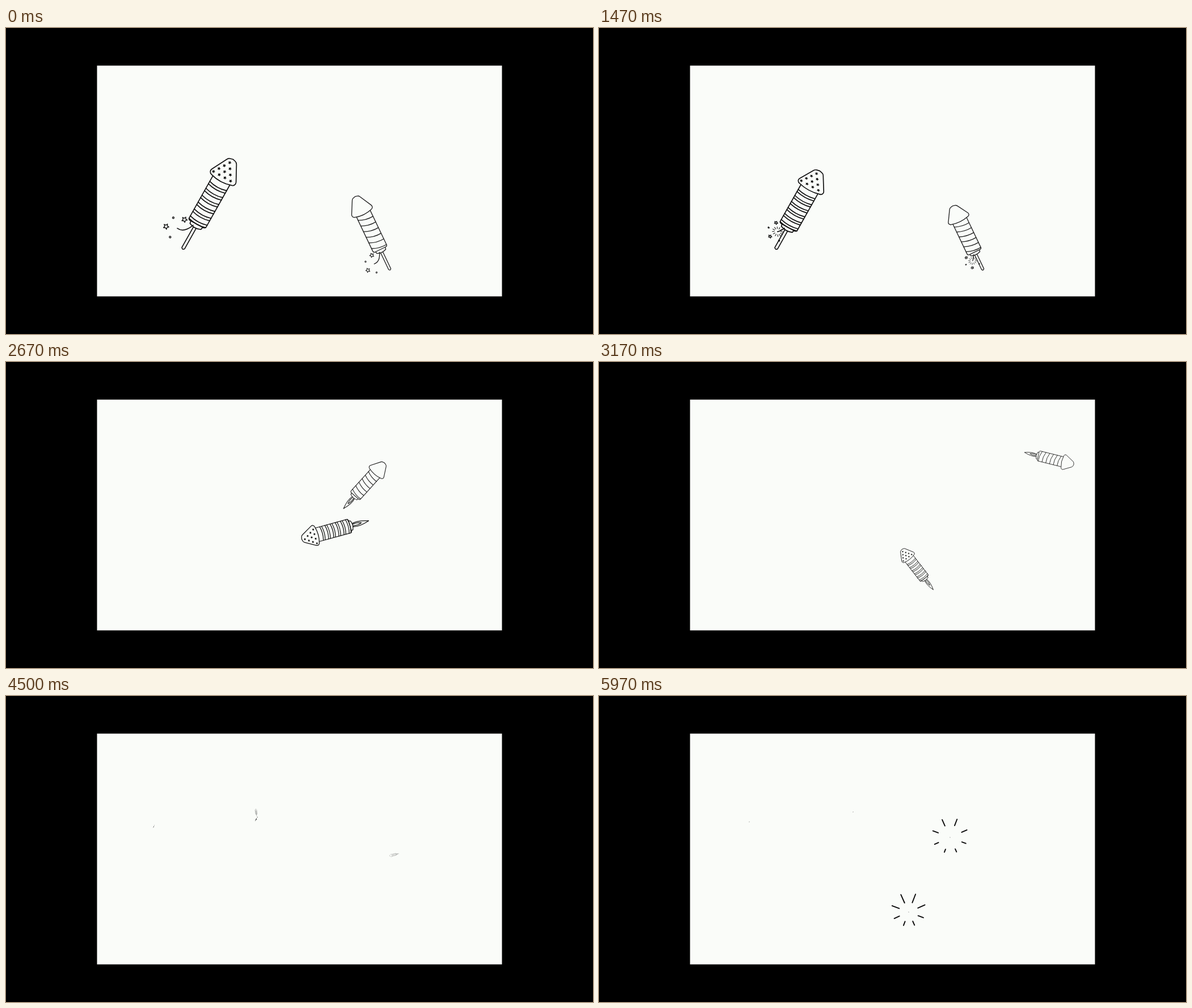
Write an HTML page with a canvas that moves like this. It is 1035 by 541 pixels and loops after 6.01 s.

```html
<!DOCTYPE html>
<html lang="en">
<head>
<meta charset="utf-8">
<title>Fireworks</title>
<style>
html, body { margin: 0; width: 100%; height: 100%; overflow: hidden; background: #000; }
canvas { display: block; }
</style>
</head>
<body>
<canvas id="stage" width="1035" height="541"></canvas>
<script>
const ctx = document.getElementById('stage').getContext('2d');
const LOOP = 6010, LAUNCH = 2150, FLIGHT = 2500, CLIMB = 620;
const PAPER = '#fafcf9';
const RAD = Math.PI / 180;
const LEN = 182;   // rocket length, from the end of the stick to the tip

// path: time, x, y of the middle; tilt: degrees after s seconds of flight
const rockets = [
  { size: 1, ink: '#111', starry: true, tail: [311.5, 391], fade: .6,
    tilt: s => 29.3 + 325 * (1 - Math.exp(-2.27 * s)),
    path: [[LAUNCH, 347, 327], [2530, 512, 248], [2850, 640, 375],
      [3170, 562, 367], [3970, 429, 317.5], [4650, 448, 172]] },
  { size: .79, ink: '#222', starry: false, tail: [677.3, 427.8], fade: .38,
    tilt: s => -25.4 + 132 * s - 5.2 * s * s,
    path: [[LAUNCH, 652.6, 376], [2530, 605, 270], [2800, 672, 182],
      [3170, 793.5, 170.5], [3970, 794, 245.5], [4650, 650, 290]] }
];

const shells = [
  { x: 265, y: 222.5, pop: 4780, r: 31, rise: 223, lean: 28 },
  { x: 448, y: 205, pop: 4800, r: 44, rise: 253, lean: 28 },
  { x: 619, y: 250, pop: 5585, r: 36, rise: 145, lean: -24 },
  { x: 546, y: 382, pop: 5732, r: 42, rise: 119, lean: -24 }
];

const FUSE = [[-4.5, -46], [-12, -26], [-26.3, -27.5]];

const clamp = v => Math.max(0, Math.min(1, v));
const mix = (a, b, k) => a + (b - a) * k;
const mixPoint = (a, b, k) => [mix(a[0], b[0], k), mix(a[1], b[1], k)];
const easeOut = p => 1 - Math.pow(1 - p, 4);

// Smooth curve through timed points
function along(path, t) {
  let i = 0;
  while (i < path.length - 2 && t > path[i + 1][0]) i++;
  const a = path[i], b = path[i + 1];
  const before = path[i - 1] || a, after = path[i + 2] || b;
  const d = b[0] - a[0], u = clamp((t - a[0]) / d), u2 = u * u, u3 = u2 * u;
  return [1, 2].map(n => {
    const ma = (b[n] - before[n]) / (b[0] - before[0]) * d;
    const mb = (after[n] - a[n]) / (after[0] - a[0]) * d;
    return (2 * u3 - 3 * u2 + 1) * a[n] + (u3 - 2 * u2 + u) * ma +
      (3 * u2 - 2 * u3) * b[n] + (u3 - u2) * mb;
  });
}

function starPath(x, y, r) {
  for (let i = 0; i < 10; i++) {
    const a = (i * 36 - 90) * RAD, d = i % 2 ? r * .48 : r;
    ctx[i ? 'lineTo' : 'moveTo'](x + d * Math.cos(a), y + d * Math.sin(a));
  }
  ctx.closePath();
}

function segment(x, y, a, r0, r1) {
  ctx.moveTo(x + r0 * Math.cos(a), y + r0 * Math.sin(a));
  ctx.lineTo(x + r1 * Math.cos(a), y + r1 * Math.sin(a));
}

function headPath() {
  ctx.moveTo(0, -182);
  ctx.arcTo(8, -180, 26, -144, 7);
  ctx.arcTo(28, -142, 0, -137, 6);
  ctx.quadraticCurveTo(0, -134, -20, -140);
  ctx.arcTo(-28, -142, -8, -180, 6);
  ctx.arcTo(-8, -180, 0, -182, 7);
  ctx.closePath();
}

function bodyPath() {
  ctx.moveTo(-17, -140);
  ctx.arcTo(-17, -51, 0, -49, 4);
  ctx.arcTo(17, -51, 17, -140, 4);
  ctx.lineTo(17, -140);
}

function capPath() {
  ctx.moveTo(-12, -51);
  ctx.lineTo(-11, -46);
  ctx.quadraticCurveTo(0, -41, 11, -46);
  ctx.lineTo(12, -51);
}

function stickPath() {
  ctx.moveTo(-2.7, -44);
  ctx.lineTo(-2.7, -2);
  ctx.quadraticCurveTo(0, 2, 2.7, -2);
  ctx.lineTo(2.7, -44);
}

function flamePath() {
  for (const [w, end] of [[6.5, 0], [3, -20]]) {
    ctx.moveTo(-w * .6, -45);
    ctx.quadraticCurveTo(-w * 1.3, -28, 0, end);
    ctx.quadraticCurveTo(w * 1.3, -28, w * .6, -45);
  }
}

function stripe(y, slope) {
  ctx.moveTo(-17, y - slope);
  ctx.quadraticCurveTo(0, y + 5, 17, y + slope);
}

function stripesPath(starry) {
  for (let y = -128; y < -55; y += 14) {
    stripe(y, starry ? 0 : 3);
    if (starry) stripe(y + 5, 0);
  }
}

// Four rows of one to four stars
function headStarsPath() {
  for (let row = 0; row < 4; row++) {
    for (let i = 0; i <= row; i++) {
      starPath((i - row / 2) * 11.5 - 2.5, -174 + row * 9.2, 3.3);
    }
  }
}

function drawFuse(draw, t) {
  const left = 1 - Math.pow(t / 1950, 2);
  if (left <= 0) return;
  const mid = mixPoint(FUSE[0], FUSE[1], left);
  const tip = mixPoint(mid, mixPoint(FUSE[1], FUSE[2], left), left);
  draw(() => {
    ctx.moveTo(...FUSE[0]);
    ctx.quadraticCurveTo(...mid, ...tip);
  }, null);

  const beat = t / 600 + .95, p = beat % 1, turn = Math.floor(beat) * 15;
  if (p < .65) {
    draw(() => {
      for (let i = 0; i < 12; i++) segment(...tip, i * 30 * RAD, 3 + 7 * p, 4 + 14 * p);
    }, null, .6);
  }
  for (let i = 0; i < 4; i++) {
    const a = (100 + i * 60 - turn) * RAD, d = 20 * easeOut(p);
    const x = tip[0] + d * Math.cos(a), y = tip[1] + d * Math.sin(a);
    draw(() => {
      if (i % 2) return starPath(x, y, 2 + 3.2 * p);
      ctx.moveTo(x + 1.5, y);
      ctx.arc(x, y, .7 + .8 * p, 0, 7);
    }, null, .8);
  }
}

function drawRocket({ size, ink, starry, tail, fade, tilt, path }, t) {
  const flown = Math.max(0, t - LAUNCH), flying = flown > 0;
  if (flown >= FLIGHT) return;
  const s = t / 1000, f = flown / 1000;
  const scale = size * Math.exp(-fade * f) * (1 - Math.pow(flown / FLIGHT, 6));
  const squash = flying ? mix(.8, .92, clamp(flown / 200)) : 1 - .075 * s - .0082 * s * s;
  const angle = tilt(f) * RAD, half = LEN / 2 * size * squash;
  const [x, y] = flying ? along(path, t)
    : [tail[0] + half * Math.sin(angle), tail[1] - half * Math.cos(angle)];

  // The pen is not squashed, only the path
  const draw = (shape, fill = PAPER, weight = 1) => {
    ctx.save();
    ctx.translate(x, y);
    ctx.rotate(angle);
    ctx.scale(scale, scale * squash);
    ctx.translate(0, LEN / 2);
    ctx.beginPath();
    shape();
    ctx.restore();
    if (fill) {
      ctx.fillStyle = fill;
      ctx.fill();
    }
    if (!weight) return;
    ctx.strokeStyle = ink;
    ctx.lineWidth = 1.7 * scale * weight;
    ctx.stroke();
  };

  draw(flying ? flamePath : stickPath);
  draw(capPath);
  draw(bodyPath);
  draw(() => stripesPath(starry), null);
  draw(headPath);
  if (starry) draw(headStarsPath, ink, 0);
  if (!flying) drawFuse(draw, t);
}

function drawComet(size) {
  ctx.scale(size, size);
  ctx.beginPath();
  ctx.arc(0, -11, 2, 0, 7);
  ctx.moveTo(-2.2, 0);
  ctx.arc(0, 0, 2.2, Math.PI, 0);
  ctx.lineTo(0, 18);
  ctx.closePath();
  ctx.fill();
}

// Eight rays, longest towards the top
function drawBurst(q, r) {
  const inner = r * Math.pow(q, .8), span = Math.max(0, r * easeOut(q) - inner);
  ctx.beginPath();
  for (let i = 0; i < 8; i++) {
    const reach = .72 + .28 * Math.cos((i - .5) * 45 * RAD);
    segment(0, 0, (i * 45 - 90) * RAD, inner, inner + span * reach);
  }
  ctx.lineWidth = 1.9;
  ctx.stroke();
}

function drawShell({ x, y, pop, r, rise, lean }, t) {
  const p = clamp((t - pop) / CLIMB + 1), q = (t - pop) / 700;
  if (p === 0) return;
  ctx.save();
  ctx.translate(x, y);
  ctx.rotate(lean * RAD);
  ctx.fillStyle = ctx.strokeStyle = '#0a0a0a';
  if (p < 1) {
    ctx.translate(0, rise * (1 - easeOut(p)));
    drawComet(r / 34 * (1 - p) * (1 - p));
  } else {
    if (q < 1) drawBurst(q, r);
    ctx.fillStyle = 'rgba(0,0,0,.35)';
    ctx.fillRect(-.5, -.8, 1, 1.6);
  }
  ctx.restore();
}

function render(t) {
  ctx.fillStyle = '#000';
  ctx.fillRect(0, 0, 1035, 541);
  ctx.save();
  ctx.beginPath();
  ctx.rect(160.5, 66.5, 714, 408);
  ctx.fillStyle = PAPER;
  ctx.fill();
  ctx.clip();
  ctx.lineCap = ctx.lineJoin = 'round';
  rockets.forEach(rocket => drawRocket(rocket, t));
  shells.forEach(shell => drawShell(shell, t));
  ctx.restore();
}

const begin = performance.now();
function tick() {
  render((performance.now() - begin) % LOOP);
  requestAnimationFrame(tick);
}
tick();
</script>
</body>
</html>
```
